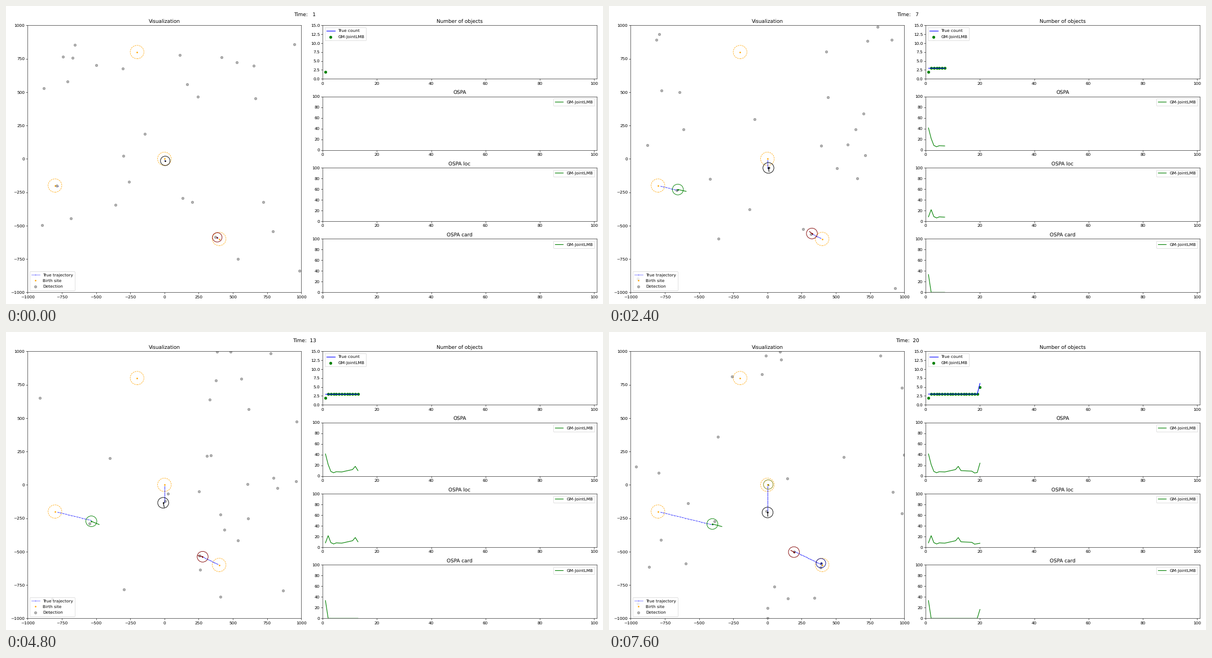
Animation, 1058 px wide and 529 px high, one loop 8000 ms. Source, as a matplotlib script:

```python
import numpy as np
import matplotlib.pyplot as plt
from matplotlib.animation import FuncAnimation
from matplotlib.patches import Circle

plt.rcParams["font.family"] = "DejaVu Sans"
plt.rcParams["text.hinting"] = "none"

W, H, STEPS = 1058, 529, 20
METHOD = "GM-JointLMB"
BIRTH_SITES = [(0, 0), (400, -600), (-800, -200), (-200, 800)]

# Constant-velocity objects: start, velocity, birth step.
OBJECTS = [
    ((0, 0), (0, -10), 1),
    ((400, -600), (-10, 5), 1),
    ((-800, -200), (20, -5), 1),
    ((400, -600), (-7, -4), 20),
    ((400, -600), (-2.5, 10), 20),
    ((0, 0), (7.5, -5), 20),
]
# Estimated tracks: object, colour, first step.
TRACKS = [(0, "black", 1), (1, "maroon", 1), (2, "green", 2),
          (4, "navy", 20), (5, "olive", 20)]
# Turning points of the mean localisation error.
LOC_KEYS = [(1, 8), (2, 21.5), (3, 8.5), (4, 6), (5, 8), (7, 7.5), (11, 12),
            (12, 18), (13, 10), (17, 9), (18, 5.6), (20, 7.3)]

steps = np.arange(1, STEPS + 1)
true_count = sum(steps >= birth for *_, birth in OBJECTS)
est_count = sum(steps >= first for *_, first in TRACKS)
loc = np.interp(steps, *zip(*LOC_KEYS))
card = 100 * (true_count - est_count) / true_count


def position(obj, step):
    start, velocity, birth = OBJECTS[obj]
    age = np.reshape(step, (-1, 1)) - birth + 1
    return np.array(start) + age * np.array(velocity)


def detections(step):
    rng = np.random.default_rng(40 + step)
    points = [rng.uniform(-1000, 1000, (rng.integers(25, 29), 2))]
    for obj, (*_, birth) in enumerate(OBJECTS):
        if birth <= step and rng.random() < 0.88:
            points.append(position(obj, step) + rng.normal(0, 10, (1, 2)))
    return np.vstack(points)


def estimate(obj, step, age):
    """Centre and heading tip: the true state plus seeded noise."""
    rng = np.random.default_rng([obj, step])
    angle = rng.uniform(0, 2 * np.pi)
    error = loc[step - 1] * np.array([np.cos(angle), np.sin(angle)])
    center = position(obj, step)[0] + error
    heading = 3 * np.array(OBJECTS[obj][1]) + rng.normal(0, 6, 2)
    return center, center + min(age, 1) * heading


def panel(title, x, y, w, h, xlim, ylim):
    ax = fig.add_axes([x / W, 1 - (y + h) / H, w / W, h / H])
    ax.set(title=title, xlim=xlim, ylim=ylim)
    return ax


def side_panel(title, row, top=100):
    return panel(title, 561.3, 34.3 + 126.37 * row, 485.4, 94.9, (0, 101), (0, top))


fig = plt.figure(figsize=(20, 10), dpi=52.9)
time_text = fig.suptitle("")

scene = panel("Visualization", 38.3, 34.3, 484.9, 474, (-1000, 1000), (-1000, 1000))
truth_lines = [scene.plot([], [], "b.-", lw=1, ms=2, alpha=0.6)[0] for _ in OBJECTS]
truth_lines[0].set_label("True trajectory")
scene.plot(*zip(*BIRTH_SITES), ".", color="orange", ms=5, label="Birth site")
for site in BIRTH_SITES:
    scene.add_patch(Circle(site, 50, fill=False, ec="orange", ls="--", lw=1))
dots, = scene.plot([], [], "ko", alpha=0.3, label="Detection")

track_art = []
for _, color, _ in TRACKS:
    ring = scene.add_patch(Circle((0, 0), 40, fill=False, ec=color, lw=1.2, zorder=2.5))
    tail, = scene.plot([], [], color=color, lw=1.5)
    center, = scene.plot([], [], ".", color=color, ms=5)
    track_art.append((ring, tail, center))
scene.legend(loc="lower left")

count_ax = side_panel("Number of objects", 0, 15)
count_line, = count_ax.plot([], [], "b", label="True count")
count_dots = count_ax.scatter([], [], color="green", label=METHOD)
count_ax.legend(loc="upper left")

metrics = []
for row, (title, values) in enumerate(
        [("OSPA", loc + card), ("OSPA loc", loc), ("OSPA card", card)], 1):
    ax = side_panel(title, row)
    line, = ax.plot([], [], color="green", label=METHOD)
    ax.legend(loc="upper right")
    metrics.append((line, values))


def update(i):
    step = i + 1
    time_text.set_text(f"Time: {step:3d}")
    dots.set_data(*detections(step).T)
    for obj, line in enumerate(truth_lines):
        line.set_data(*position(obj, np.arange(OBJECTS[obj][2], step + 1)).T)

    for (obj, _, first), art in zip(TRACKS, track_art):
        for part in art:
            part.set_visible(step >= first)
        ring, tail, center = art
        age = step - first
        here, tip = estimate(obj, step, age)
        ring.set_center(here)
        ring.set_radius(np.interp(age, [0, 3], [35, 40]))
        tail.set_data(*zip(here, tip))
        center.set_data([here[0]], [here[1]])

    count_line.set_data(steps[:step], true_count[:step])
    count_dots.set_offsets(np.column_stack([steps, est_count])[:step])
    for line, values in metrics:
        line.set_data(steps[:step], values[:step])
    return []


anim = FuncAnimation(fig, update, frames=STEPS, interval=400, repeat=True, repeat_delay=0)
plt.show()
```
